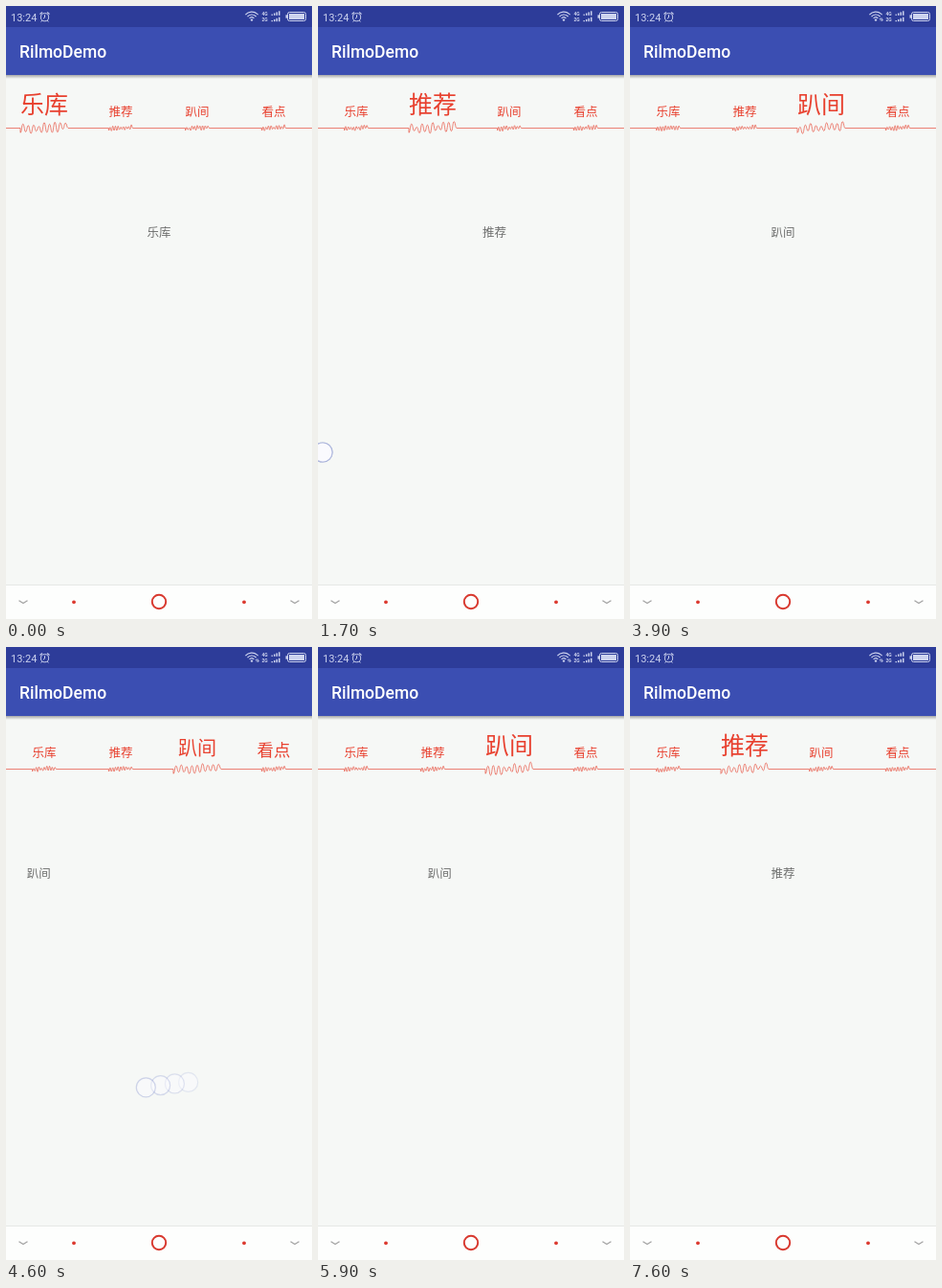
An HTML page with a canvas for the animation above (8 s loop, 320 by 640 pixels).

```html
<!DOCTYPE html>
<html lang="zh-CN">
<head>
<meta charset="utf-8">
<title>Tab pager</title>
<style>
  html, body { margin: 0; width: 100%; height: 100%; overflow: hidden; background: #f6f8f6; }
  canvas { display: block; width: 320px; height: 640px; }
</style>
</head>
<body>
<canvas id="stage"></canvas>
<script>
const W = 320, H = 640, LOOP = 8000, STEP = 100;
const LINE_Y = 127.5, SLOP = 8, TOUCH_LINGER = 100;
const TABS = ['乐库', '推荐', '趴间', '看点'];
const CJK = '"Noto Sans CJK SC", "Noto Sans CJK", "Noto Sans", sans-serif';
const RED = '#e8412f', PALE = '#ccd2ee';

// Each swipe: finger down, finger up, page at rest; pages; finger path.
const accelerate = k => u => u ** k;
const slowDown = k => u => 1 - (1 - u) ** k;
const SWIPES = [
  { down: 100, up: 1620, rest: 2100, from: 0, to: 1, a: [272, 438], b: [5, 466], ease: slowDown(1.153) },
  { down: 2800, up: 3400, rest: 3900, from: 1, to: 2, a: [270, 452], b: [30, 480], ease: accelerate(1.3) },
  { down: 4300, up: 4700, rest: 5200, from: 2, to: 3, a: [280, 450], b: [80, 472], ease: accelerate(1.4) },
  { down: 5600, up: 5800, rest: 6200, from: 3, to: 2, a: [40, 468], b: [230, 460], ease: accelerate(1.5) },
  { down: 6800, up: 7150, rest: 7600, from: 2, to: 1, a: [47, 466.5], b: [215, 470], ease: accelerate(2) }
];

const canvas = document.getElementById('stage');
const ctx = canvas.getContext('2d');
const ratio = window.devicePixelRatio || 1;
canvas.width = W * ratio;
canvas.height = H * ratio;

const clamp = v => Math.min(1, Math.max(0, v));
const mix = (a, b, u) => a + (b - a) * u;

function randomFrom(seed) {
  let s = (seed * 2654435761 + 12345) >>> 0;
  return () => {
    s = (s + 0x6d2b79f5) >>> 0;
    let r = Math.imul(s ^ (s >>> 15), s | 1);
    r ^= r + Math.imul(r ^ (r >>> 7), r | 61);
    return ((r ^ (r >>> 14)) >>> 0) / 4294967296;
  };
}

function fingerAt(s, t) {
  const u = s.ease(clamp((t - s.down) / (s.up - s.down)));
  return [mix(s.a[0], s.b[0], u), mix(s.a[1], s.b[1], u * u)];
}

function dragged(s, t) {
  const travel = Math.abs(fingerAt(s, t)[0] - s.a[0]);
  return Math.max(0, travel - SLOP) / W;
}

function stateAt(t) {
  const s = SWIPES.filter(w => t >= w.down).pop();
  if (!s) return { page: 0, tab: 0, selected: 0, seed: 0 };
  const released = t >= s.up;
  let p = dragged(s, Math.min(t, s.up));
  if (released) {
    const u = clamp((t - s.up) / (s.rest - s.up));
    p = 1 - (1 - p) * (1 - u) ** 5;
  }
  const page = mix(s.from, s.to, p);
  return {
    page,
    tab: released ? s.to : page,
    selected: released ? s.to : s.from,
    seed: Math.min(t, s.rest) / STEP,
    swipe: t < s.up + TOUCH_LINGER ? s : null
  };
}

function rect(x, y, w, h, fill) {
  ctx.fillStyle = fill;
  ctx.fillRect(x, y, w, h);
}

function text(str, x, y, font, fill, align = 'left') {
  ctx.font = font;
  ctx.fillStyle = fill;
  ctx.textAlign = align;
  ctx.fillText(str, x, y);
}

function stroke(color, width, trace) {
  ctx.strokeStyle = color;
  ctx.lineWidth = width;
  ctx.beginPath();
  trace();
  ctx.stroke();
}

function disc(x, y, r, fill) {
  ctx.fillStyle = fill;
  ctx.beginPath();
  ctx.arc(x, y, r, 0, 7);
  ctx.fill();
}

function polyline(...pts) {
  pts.forEach(([x, y], i) => i ? ctx.lineTo(x, y) : ctx.moveTo(x, y));
}

function alarmIcon(x, y) {
  stroke(PALE, 1, () => ctx.arc(x, y, 4.1, 0, 7));
  stroke(PALE, 1, () => polyline([x, y - 2.5], [x, y + 0.3], [x - 1.6, y + 1.6]));
  for (const d of [-1, 1]) {
    stroke(PALE, 1.1, () => polyline([x + d * 2.6, y - 5.2], [x + d * 5, y - 3.2]));
    stroke(PALE, 1, () => polyline([x + d * 2.8, y + 3.4], [x + d * 3.8, y + 4.8]));
  }
}

function wifiIcon(x, y, busy) {
  for (const r of [3.2, 6, 8.8]) {
    stroke(PALE, 1.2, () => ctx.arc(x, y, r, -Math.PI * 0.77, -Math.PI * 0.23));
  }
  disc(x, y - 0.4, 1.2, PALE);
  if (busy) {
    stroke(PALE, 0.8, () => polyline([x + 4, y - 1], [x + 5.1, y - 2.4], [x + 5.1, y + 0.6]));
    stroke(PALE, 0.8, () => polyline([x + 6.6, y - 2.4], [x + 6.6, y + 0.6], [x + 7.6, y - 0.8]));
  }
}

function statusBar(t) {
  rect(0, 0, W, 22, '#2d3c99');
  text('13:24', 5, 15.7, '11px Roboto, sans-serif', PALE);
  alarmIcon(40.5, 11.7);
  wifiIcon(257, 15, t >= 2800);
  ['4G', '2G'].forEach((label, row) => {
    const y = 9.8 + row * 6.4;
    text(label, 267.5, y, 'bold 5px Roboto, sans-serif', PALE);
    for (let i = 0; i < 4; i++) {
      const h = 1.2 + i * 1.1;
      rect(277.5 + i * 2.5, y - h, 1.5, h, PALE);
    }
  });
  stroke(PALE, 1, () => ctx.roundRect(294.5, 6.5, 19, 9, 2));
  rect(296, 8, 16, 6, PALE);
  rect(292.5, 9.3, 1.5, 3.4, PALE);
}

function toolbar() {
  const shade = ctx.createLinearGradient(0, 72, 0, 76);
  shade.addColorStop(0, 'rgba(0,0,0,.32)');
  shade.addColorStop(1, 'rgba(0,0,0,0)');
  rect(0, 72, W, 4, shade);
  rect(0, 22, W, 50, '#3b4eb2');
  text('RilmoDemo', 14, 54, '500 17.5px Roboto, sans-serif', '#fff');
}

function waveTo(cx, scale, rnd) {
  const halves = 17, w = 25 * scale, left = cx - w / 2;
  const dx = w / (halves + 1);
  let x = left, y = LINE_Y + 2.4 * scale;
  ctx.lineTo(left, LINE_Y);
  ctx.lineTo(left, y);
  for (let i = 1; i <= halves + 1; i++) {
    const side = i % 2 ? -1 : 1;
    const drift = mix(0.7, -0.9, i / halves);
    const ny = i > halves ? LINE_Y : LINE_Y + scale * (side * mix(0.8, 2.8, rnd()) + drift);
    ctx.bezierCurveTo(x + dx / 2, y, x + dx / 2, ny, x + dx, ny);
    x += dx;
    y = ny;
  }
}

function tabs({ tab, selected, seed }) {
  const rnd = randomFrom(seed);
  stroke('#e96455', 0.8, () => {
    ctx.moveTo(0, LINE_Y);
    TABS.forEach((_, i) => waveTo(40 + i * 80, i === selected ? 2 : 1, rnd));
    ctx.lineTo(W, LINE_Y);
  });
  TABS.forEach((label, i) => {
    const grow = clamp(1 - Math.abs(i - tab));
    const size = 12.5 * (1 + grow);
    text(label, 40 + i * 80, mix(114.8, 112, grow), `${size}px ${CJK}`, RED, 'center');
  });
}

function pages({ page }) {
  TABS.forEach((label, i) => {
    const x = W / 2 + (i - page) * W;
    if (x > -20 && x < W + 20) text(label, x, 241, `12.5px ${CJK}`, '#6e6f6e', 'center');
  });
}

function touch({ swipe }, t) {
  if (!swipe) return;
  for (const lag of [75, 50, 25, 0]) {
    const [x, y] = fingerAt(swipe, t - lag);
    disc(x, y, 10, 'rgba(250,251,254,.45)');
    stroke(`rgba(130,145,205,${0.36 - lag / 400})`, 1.2, () => ctx.arc(x, y, 10, 0, 7));
  }
}

function navBar() {
  rect(0, 604, W, 36, '#fdfefd');
  rect(0, 604, W, 1, '#e6e8e6');
  for (const x of [18, 302]) {
    stroke('#a2a2a2', 1.2, () => polyline([x - 4.5, 620.8], [x, 623.6], [x + 4.5, 620.8]));
  }
  for (const x of [71, 249]) disc(x, 622.3, 1.9, '#dc3a30');
  stroke('#d8392f', 2, () => ctx.arc(160, 622, 7.2, 0, 7));
}

function draw(now) {
  const t = Math.floor((now % LOOP) / STEP) * STEP;
  const state = stateAt(t);
  ctx.setTransform(ratio, 0, 0, ratio, 0, 0);
  rect(0, 0, W, H, '#f6f8f6');
  tabs(state);
  pages(state);
  toolbar();
  statusBar(t);
  navBar();
  touch(state, t);
}

const start = performance.now();
function tick() {
  draw(performance.now() - start);
  requestAnimationFrame(tick);
}
tick();
</script>
</body>
</html>
```
